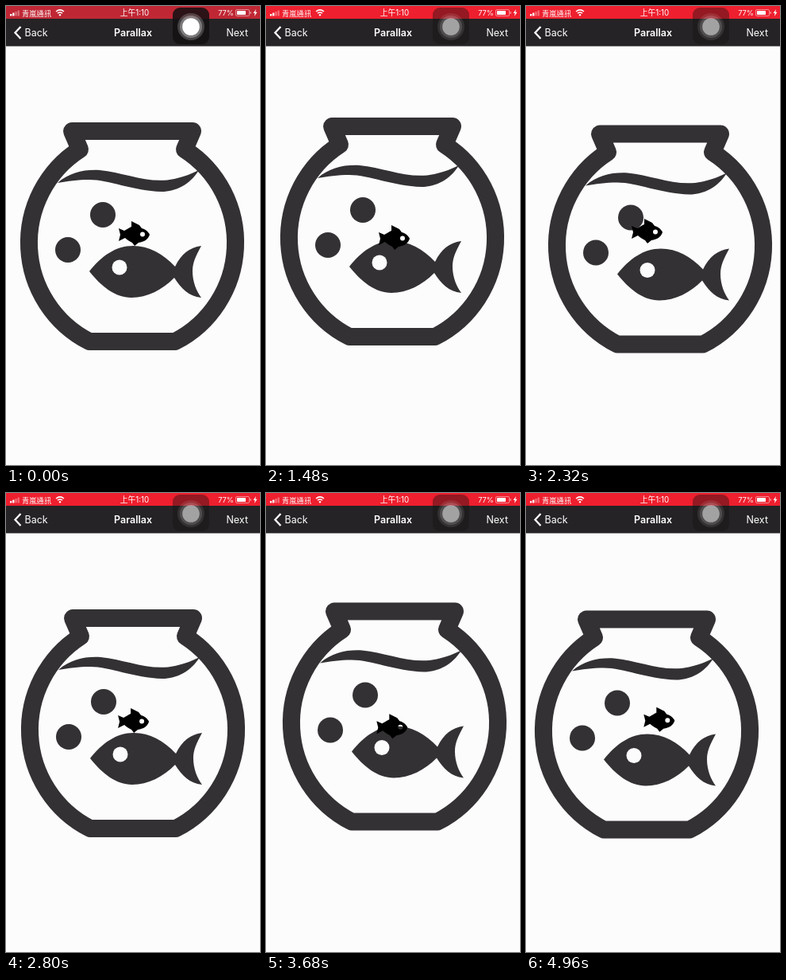
These frames come from a looping animation (320 px wide and 576 px high, 5 s). An HTML page with a canvas:

```html
<!DOCTYPE html>
<html lang="zh-Hant">
<head>
<meta charset="utf-8">
<title>Parallax</title>
<style>
html, body { margin: 0; width: 100%; height: 100%; overflow: hidden; background: #fdfcfd; }
canvas { display: block; width: 320px; height: 576px; }
</style>
</head>
<body>
<canvas id="stage" width="320" height="576"></canvas>
<script>
const ctx = document.getElementById('stage').getContext('2d');
const LOOP = 5000, STEP = 40;
const INK = '#333133';

// Device tilt: time, horizontal shift, vertical shift
const tilt = [
  [0, 0, 0], [160, -2, -1], [360, -9, -5], [560, 4, 0], [740, 9, -5],
  [940, 3, 6], [1120, -11, 10], [1300, -9, -2], [1480, 0, -6], [1640, 8, -2],
  [1800, 1, 9], [1960, -16, 5], [2120, -7, 0], [2240, 3, 2], [2320, 10, 3.5],
  [2440, 18, 4.5], [2600, 7, 2], [2720, 0, 0], [2800, 1, 0], [2860, 6, -2],
  [3140, -16, 4], [3360, -11, 10], [3520, -7, -5], [3600, -2, -12],
  [3680, 3, -8.5], [3800, 9, 0], [3940, 0, 7], [4080, -14, 3], [4200, -3, -2],
  [4320, 10, 0.5], [4380, 15, 1], [4480, 8, -2], [4640, -5, -10],
  [4800, -12, -1], [4920, -9, 2.5], [4960, -7, 1.5], [5000, -6, 1]
];

const bowl = new Path2D(`M83 157 H235 L225 180 A139 139 0 0 1 213 421
  H105 A139 139 0 0 1 93 180 Z`);
const water = new Path2D(`M65 222 C80 209 98 205 118 206
  C150 209 180 224 212 217 C226 214 234 210 243 206
  C232 224 214 233 196 233 C160 232 130 218 105 218 C90 218 78 220 65 222 Z`);
const bigFish = new Path2D(`M105 333 C120 314 138 301 160 301
  C180 301 198 311 213 327 C221 311 231 303 246 301
  C239 314 235 322 235 333 C235 346 240 358 246 366
  C230 364 221 355 212 341 C197 356 178 366 158 366 C138 366 120 352 105 333 Z`);
const smallFish = new Path2D(`M142 279 L149 282 C153 280 155 278 158 277
  L158 270 L168 275 L171 279 C176 280 180 284 181 287
  C179 293 174 296 167 297 L162 301 L159 297
  C155 295 152 293 150 291 L142 295 L144 287 Z
  M175 286.5 A3 3 0 1 0 169 286.5 A3 3 0 1 0 175 286.5 Z`);

const clamp = v => Math.max(0, Math.min(1, v));

function slope(i, axis) {
  if (i === 0 || i === tilt.length - 1) return 0;
  const [a, b, c] = [tilt[i - 1], tilt[i], tilt[i + 1]];
  if ((b[axis] - a[axis]) * (c[axis] - b[axis]) <= 0) return 0;
  return (c[axis] - a[axis]) / (c[0] - a[0]);
}

function shift(time, axis) {
  const i = tilt.findIndex(k => k[0] > time) - 1;
  const a = tilt[i], b = tilt[i + 1], span = b[0] - a[0];
  const u = (time - a[0]) / span, v = 1 - u;
  return a[axis] * v * v * (1 + 2 * u) + b[axis] * u * u * (3 - 2 * u)
    + span * u * v * (slope(i, axis) * v - slope(i + 1, axis) * u);
}

function disc(x, y, r, color) {
  ctx.fillStyle = color;
  ctx.beginPath();
  ctx.arc(x, y, r, 0, Math.PI * 2);
  ctx.fill();
}

function rect(x, y, w, h, color, r = 0) {
  ctx.fillStyle = color;
  ctx.beginPath();
  ctx.roundRect(x, y, w, h, r);
  ctx.fill();
}

function line(path, color, width) {
  ctx.strokeStyle = color;
  ctx.lineWidth = width;
  ctx.stroke(new Path2D(path));
}

function text(str, x, y, font, align = 'left') {
  ctx.font = font;
  ctx.textAlign = align;
  ctx.fillText(str, x, y);
}

function drawBowl(dx, dy) {
  ctx.save();
  ctx.translate(dx, dy);
  ctx.lineJoin = 'round';
  ctx.strokeStyle = ctx.fillStyle = INK;
  ctx.lineWidth = 22;
  ctx.stroke(bowl);
  ctx.fill(water);
  ctx.fill(bigFish);
  disc(122, 262, 16, INK);
  disc(78, 306, 16, INK);
  disc(143, 328, 9.5, '#fdfcfd');
  ctx.restore();
}

function drawSmallFish(dx, dy) {
  ctx.save();
  ctx.translate(-0.9 * dx, -0.85 * dy);
  ctx.fillStyle = '#000';
  ctx.fill(smallFish, 'evenodd');
  ctx.restore();
}

function drawStatus(time) {
  const phase = (time + 1025 - 20) % 2050 - 1025;
  const dim = clamp(1.4 - Math.abs(phase) / 110);
  rect(0, 0, 320, 16, `rgb(${238 - 46 * dim}, ${31 + 8 * dim}, ${46 + 6 * dim})`);
  for (let i = 0; i < 4; i++) {
    rect(5 + i * 3.2, 10 - i * 1.5, 2.3, 2.5 + i * 1.5, i < 2 ? '#fff' : 'rgba(255,255,255,.35)', 0.5);
  }
  ctx.fillStyle = '#fff';
  text('青嵐通訊', 20, 12.5, '9.3px "Noto Sans CJK TC", "Noto Sans CJK", sans-serif');
  text('上午1:10', 162, 12.3, '9.8px Inter, "Noto Sans CJK TC", "Noto Sans CJK", sans-serif', 'center');
  text('77%', 287, 12, '9.3px Inter, sans-serif', 'right');
  line('M63 7 Q68 2.8 73 7 M65 9.2 Q68 6.8 71 9.2', '#fff', 1.5);
  disc(68, 11.3, 1.2, '#fff');
  line('M291 4.5 H305 Q306.5 4.5 306.5 6 V11 Q306.5 12.5 305 12.5 H291 Q289.5 12.5 289.5 11 V6 Q289.5 4.5 291 4.5 Z', 'rgba(255,255,255,.6)', 0.8);
  rect(291, 6, 11, 5, '#fff', 0.7);
  rect(307.5, 7, 1.2, 3, 'rgba(255,255,255,.6)', 0.5);
  ctx.fillStyle = '#fff';
  ctx.fill(new Path2D('M315 4 L311.5 9 H313.7 L312.8 13 L316.5 7.8 H314.2 Z'));
}

function drawNav() {
  rect(0, 16, 320, 34.5, '#252325');
  line('M18.5 26 L11.5 33.5 L18.5 41', '#fff', 2.3);
  ctx.fillStyle = '#fff';
  text('Back', 23.5, 38, '12.5px Inter, sans-serif');
  text('Parallax', 160, 38, '600 12.5px Inter, sans-serif', 'center');
  text('Next', 305, 38, '12.5px Inter, sans-serif', 'right');
}

function drawTouchButton(time) {
  ctx.save();
  ctx.globalAlpha = 1 - 0.52 * clamp((time - 900) / 450);
  rect(210, 2, 46, 46, 'rgba(20,17,19,.86)', 9);
  disc(233, 26, 17, 'rgba(255,255,255,.2)');
  disc(233, 26, 14, 'rgba(255,255,255,.3)');
  disc(233, 26, 10.8, '#fff');
  ctx.restore();
}

function draw(now) {
  const time = Math.floor((now % LOOP) / STEP) * STEP;
  const dx = shift(time, 1), dy = shift(time, 2);
  rect(0, 0, 320, 576, '#fdfcfd');
  drawBowl(dx, dy);
  drawSmallFish(dx, dy);
  drawStatus(time);
  drawNav();
  drawTouchButton(time);
}

const start = performance.now();
function tick() {
  draw(performance.now() - start);
  requestAnimationFrame(tick);
}
tick();
</script>
</body>
</html>
```
